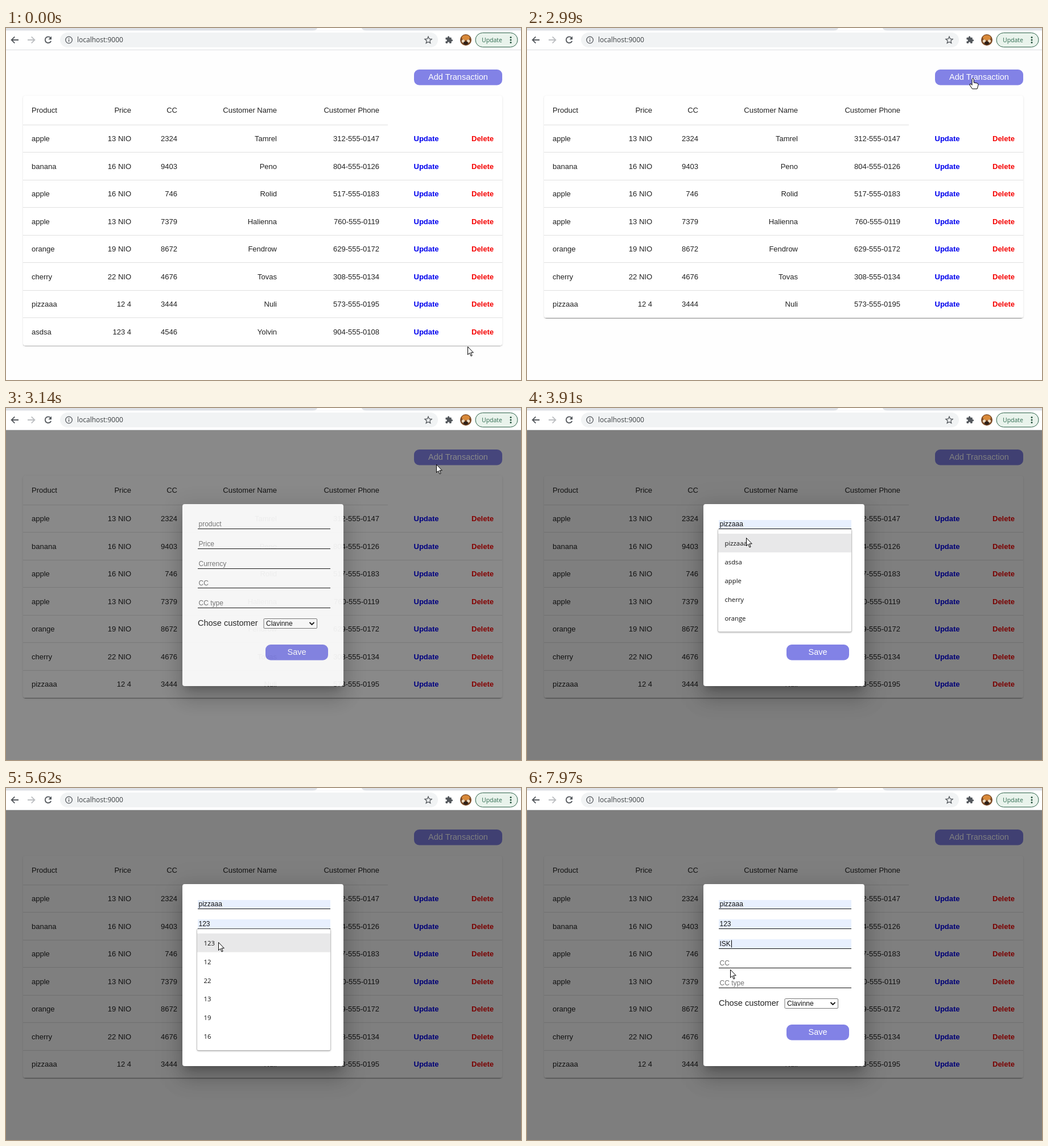
An HTML page that plays this animation: 905 by 619 pixels, repeating every 8 s.

```html
<!DOCTYPE html>
<html lang="en">
<head>
<meta charset="utf-8">
<title>Transactions</title>
<style>
  html, body { margin: 0; width: 100%; height: 100%; overflow: hidden; background: #fff; }
  svg { display: block; width: 100vw; height: 100vh; }
  text { font-family: "Liberation Sans", Arial, sans-serif; white-space: pre; }
  .ui { font-family: "Open Sans", "Noto Sans", sans-serif; }
</style>
</head>
<body>
<svg id="stage" viewBox="0 0 905 619"></svg>
<script>
const LOOP = 8000, ROW = 48.5, HEAD = 170.5, STEP = 34.75, ITEM = 32.9;
const INK = '#212121', VIOLET = '#8282e6';
const stage = document.getElementById('stage');

function add(parent, tag, attrs = {}) {
  const el = document.createElementNS(stage.namespaceURI, tag);
  for (const k in attrs) el.setAttribute(k, attrs[k]);
  parent.appendChild(el);
  return el;
}
const group = parent => add(parent, 'g');
const rect = (p, x, y, width, height, fill, more) => add(p, 'rect', { x, y, width, height, fill, ...more });
const path = (p, d, more) => add(p, 'path', { d, fill: 'none', ...more });
const circle = (p, cx, cy, r, fill, more) => add(p, 'circle', { cx, cy, r, fill, ...more });
function label(p, x, y, str, size, fill = INK, more) {
  const el = add(p, 'text', { x, y, 'font-size': size, fill, ...more });
  el.textContent = str;
  return el;
}
const END = { 'text-anchor': 'end' }, MID = { 'text-anchor': 'middle' }, BOLD = { 'font-weight': 700 };
const show = (el, on) => el.setAttribute('display', on ? 'inline' : 'none');

// White paper with layered shadows given as [dy, blur, spread, alpha]
function paper(p, x, y, w, h, r, shadows) {
  for (const [dy, blur, s, a] of shadows)
    rect(p, x - s, y - s + dy, w + 2 * s, h + 2 * s, '#000',
      { rx: r, 'fill-opacity': a, style: `filter:blur(${blur / 2}px)` });
  return rect(p, x, y, w, h, '#fff', { rx: r });
}
function button(p, x, y, w, str) {
  rect(p, x, y, w, 27.5, VIOLET, { rx: 9 });
  label(p, x + w / 2, y + 18.3, str, 14.5, '#fff', MID);
}

/* Page */
const page = group(stage);
rect(page, 0, 38, 905, 581, '#fefefe');
button(page, 717, 73, 155, 'Add Transaction');

const CARD = [[2, 1, -1, .2], [1, 1, 0, .14], [1, 3, 0, .12]];
const cards = [7, 8].map(n => {
  const g = group(page);
  paper(g, 30, 119, 842, HEAD + n * ROW - 119, 4, CARD);
  return g;
});

const RIGHTS = [220, 301, 476, 656];
function cells(p, y, values) {
  label(p, 45, y, values[0], 13);
  values.slice(1).forEach((v, i) => label(p, RIGHTS[i], y, v, 13, INK, END));
}
cells(page, 149, ['Product', 'Price', 'CC', 'Customer Name', 'Customer Phone']);
rect(page, 30, 170, 641, 1, '#e0e0e0');

const rows = [
  'apple|13 NIO|2324|Tamrel|312-555-0147',
  'banana|16 NIO|9403|Peno|804-555-0126',
  'apple|16 NIO|746|Rolid|517-555-0183',
  'apple|13 NIO|7379|Halienna|760-555-0119',
  'orange|19 NIO|8672|Fendrow|629-555-0172',
  'cherry|22 NIO|4676|Tovas|308-555-0134',
  'pizzaaa|12 4|3444|Nuli|573-555-0195',
  'asdsa|123 4|4546|Yolvin|904-555-0108'
].map((line, i) => {
  const g = group(page), y = Math.floor(HEAD + 29 + i * ROW);
  cells(g, y, line.split('|'));
  label(g, 716.5, y - .5, 'Update', 13, '#0000ee', BOLD);
  label(g, 818, y - .5, 'Delete', 13, '#f50000', BOLD);
  rect(g, 30, Math.floor(HEAD + (i + 1) * ROW - .5), 842, 1, '#e0e0e0');
  return g;
});

const shade = rect(stage, 0, 38, 905, 581, '#000');

/* Browser bar */
const bar = group(stage), GREY = '#54585d';
rect(bar, 0, 0, 905, 38, '#fff');
rect(bar, 0, 0, 905, 4.5, '#dee1e6');
path(bar, 'M539 4.6Q546 4 547 0H625Q626 4 633 4.6Z', { fill: '#fff' });
rect(bar, 0, 38, 905, 1, '#dcdee1');
rect(bar, 95, 8, 664, 26, '#f1f3f4', { rx: 13 });
path(bar, 'M22 21H10M15.3 15.3L9.6 21L15.3 26.7', { stroke: GREY, 'stroke-width': 1.8 });
path(bar, 'M38 21H50M44.7 15.3L50.4 21L44.7 26.7', { stroke: '#bcbec1', 'stroke-width': 1.8 });
path(bar, 'M78.2 17.2A5.4 5.4 0 1 0 79.2 22.8', { stroke: GREY, 'stroke-width': 1.8 });
path(bar, 'M80 14.6V20.2H74.4Z', { fill: GREY });
circle(bar, 110.5, 21, 5.8, 'none', { stroke: GREY, 'stroke-width': 1.3 });
path(bar, 'M110.5 20V24.3M110.5 17.6V18.9', { stroke: GREY, 'stroke-width': 1.3 });
label(bar, 125, 25.3, 'localhost:9000', 12, '#3c4043', { class: 'ui' });
let star = '';
for (let i = 0; i < 10; i++) {
  const a = i * Math.PI / 5, r = i % 2 ? 2.9 : 6.4;
  star += (i ? 'L' : 'M') + (742 + r * Math.sin(a)) + ' ' + (21.5 - r * Math.cos(a));
}
path(bar, star + 'Z', { stroke: GREY, 'stroke-width': 1.3 });
path(bar, 'M20.5 11H19V7c0-1.1-.9-2-2-2h-4V3.5a2.5 2.5 0 0 0-5 0V5H4c-1.1 0-2 .9-2 2v3.8h1.5a2.7 2.7 0 0 1 0 5.4H2V20c0 1.1.9 2 2 2h3.8v-1.5a2.7 2.7 0 0 1 5.4 0V22H17c1.1 0 2-.9 2-2v-4h1.5a2.5 2.5 0 0 0 0-5z',
  { fill: GREY, transform: 'translate(771.2 13.6) scale(.61)' });
circle(bar, 808, 21, 10, '#7c4a24');
add(bar, 'ellipse', { cx: 808, cy: 17, rx: 7, ry: 4.5, fill: '#d98a3a' });
circle(bar, 803.5, 23, 2.7, '#ead9c0');
circle(bar, 812.5, 23, 2.7, '#ead9c0');
add(bar, 'ellipse', { cx: 808, cy: 26.5, rx: 4, ry: 3, fill: '#2f2018' });
rect(bar, 825, 8.5, 74, 25, '#e9f3ec', { rx: 12.5, stroke: '#2c6148' });
label(bar, 836, 25, 'Update', 10.5, '#2f6b50', { class: 'ui' });
for (const y of [16.5, 21, 25.5]) circle(bar, 887, y, 1.5, '#24513c');

/* Dialog */
const modal = group(stage);
paper(modal, 310, 169, 283, 320, 4, [[10, 14, -6, .2], [22, 34, 3, .14], [8, 41, 7, .12]]);

const fields = [
  { name: 'product', value: 'pizzaaa', focus: 3680, open: 3760, pick: 4430,
    items: ['pizzaaa', 'asdsa', 'apple', 'cherry', 'orange'] },
  { name: 'Price', value: '123', focus: 4800, open: 4830, pick: 5650,
    items: ['123', '12', '22', '13', '19', '16'] },
  { name: 'Currency', value: 'ISK', focus: 6230, open: 6290, pick: 7480,
    items: ['4', 'ISK', 'dasdas', '23', 'das'] },
  { name: 'CC' },
  { name: 'CC type' }
];
fields.forEach((f, i) => {
  f.line = 212.5 + i * STEP;
  f.fill = rect(modal, 337, Math.round(f.line - 16), 233, 16, '#e8f0fe');
  rect(modal, 337, Math.round(f.line - .5), 233, 1, '#111');
  f.hint = label(modal, 338.5, f.line - 4.3, f.name, 12, '#757575');
  f.text = label(modal, 338.5, f.line - 4.3, '', 12, '#111');
  f.caret = rect(modal, 339, f.line - 14.5, 1, 13, '#000');
});
let wave = 'M339 210';
for (let x = 341; x <= 381; x += 2) wave += `L${x} ${x % 4 === 1 ? 208.8 : 210.6}`;
const typo = path(modal, wave, { stroke: '#f03030', 'stroke-width': .9 });

label(modal, 337, 383, 'Chose customer', 14.5);
rect(modal, 453, 370.5, 93.5, 17, '#fff', { rx: 1.5, stroke: '#767676' });
label(modal, 457, 383.2, 'Clavinne', 12, '#111');
path(modal, 'M533.5 377L537.5 381L541.5 377', { stroke: '#111', 'stroke-width': 1.8 });
button(modal, 456, 416, 110, 'Save');

for (const f of fields) if (f.items) {
  f.top = f.line + .5;
  f.popup = group(modal);
  paper(f.popup, 336, f.top, 234, 16 + f.items.length * ITEM, 2, [[1, 3, 0, .4], [0, 1, .5, .2]]);
  f.glow = rect(f.popup, 336, f.top, 234, ITEM, '#e8e8e9');
  f.items.forEach((s, i) =>
    label(f.popup, 347.5, f.top + 29 + i * ITEM, s, 11.3, '#111', { class: 'ui' }));
}

/* Pointer */
const pointer = group(stage);
const WHITE = { fill: '#fff', stroke: '#000', 'stroke-linejoin': 'round' };
const shapes = {
  arrow: path(pointer, 'M.5 .5V14.5L3.7 11.5L6.1 17L8.1 16.1L5.8 10.8H10.3Z', WHITE),
  hand: path(pointer, 'M-2 10V1.5a1.6 1.6 0 0 1 3.2 0V7l5.5 1q2.3.5 2.3 2.8L8 15l-1 3H-1.5L-5.5 12q-1.5-2.5.5-2.8q1.5-.2 3 2.3z', WHITE),
  beam: path(pointer, 'M-3 -7.5Q0 -7.5 0 -6V6Q0 7.5 -3 7.5M3 -7.5Q0 -7.5 0 -6M0 6Q0 7.5 3 7.5', { stroke: '#000', 'stroke-width': 1.2 })
};
const track = [
  [70, 811, 560], [520, 845, 541], [700, 845, 541], [830, 841, 533], [1000, 841, 533],
  [1040, 838, 529], [1830, 838, 529], [2330, 783, 63], [2530, 785, 86], [2760, 785, 88],
  [3070, 783, 90], [3140, 757, 99], [3530, 395, 215], [3680, 388, 206], [3760, 388, 206],
  [3990, 383, 240], [4830, 383, 240], [4960, 383, 240], [5000, 376, 237], [5200, 376, 237],
  [5400, 373, 271], [5900, 372, 271], [6000, 372, 280], [6640, 372, 280], [6710, 368, 287],
  [6790, 365, 362], [7000, 365, 362], [7270, 358, 335], [7420, 358, 335], [7540, 358, 327],
  [7830, 358, 322], [7930, 358, 322], [7970, 357, 319]
];
function locate(t) {
  const i = track.findIndex(k => k[0] > t);
  if (i === 0) return track[0].slice(1);
  if (i < 0) return track[track.length - 1].slice(1);
  const [a, ax, ay] = track[i - 1], [b, bx, by] = track[i], u = (t - a) / (b - a);
  return [ax + (bx - ax) * u, ay + (by - ay) * u];
}

// cubic-bezier(.4, 0, .2, 1)
function ease(x) {
  if (x <= 0) return 0;
  if (x >= 1) return 1;
  let lo = 0, hi = 1, s = .5;
  for (let i = 0; i < 20; i++) {
    s = (lo + hi) / 2;
    if (1.2 * s * (1 - s) ** 2 + .6 * s * s * (1 - s) + s ** 3 < x) lo = s; else hi = s;
  }
  return s * s * (3 - 2 * s);
}

function cursorKind(x, y, count, dialog, popup) {
  if (dialog) {
    if (popup && y >= popup.top) return 'arrow';
    const over = fields.some(f => y > f.line - 16 && y < f.line);
    return over && x > 337 && x < 570 ? 'beam' : 'arrow';
  }
  if (x > 717 && x < 872 && y > 73 && y < 100) return 'hand';
  const row = Math.floor((y - HEAD) / ROW);
  const near = Math.abs(y - HEAD - (row + .5) * ROW) < 7;
  return row >= 0 && row < count && near && x > 818 && x < 857 ? 'hand' : 'arrow';
}

function draw(t) {
  const count = t < 1300 ? 8 : 7;
  show(cards[0], count === 7);
  show(cards[1], count === 8);
  show(rows[7], count === 8);

  const fade = ease((t - 3013) / 190), [x, y] = locate(t);
  shade.setAttribute('opacity', fade / 2);
  modal.setAttribute('opacity', fade);
  show(modal, fade > 0);

  let popup = null;
  fields.forEach((f, i) => {
    let value = '', focused = false, preview = false;
    if (f.items) {
      const open = t >= f.open && t < f.pick;
      const hover = open ? Math.floor((y - f.top - 8) / ITEM) : -1;
      if (open) popup = f;
      preview = hover >= 0;
      value = t >= f.pick ? f.value : preview ? f.items[hover] : '';
      focused = t >= f.focus && t < (fields[i + 1].focus || LOOP);
      show(f.popup, open);
      show(f.glow, preview);
      f.glow.setAttribute('y', f.top + 8 + Math.max(hover, 0) * ITEM);
    }
    f.text.textContent = value;
    show(f.fill, value);
    show(f.hint, !value);
    const since = t - (t >= f.pick ? f.pick : f.focus);
    const lit = focused && !preview && since % 1060 < 530;
    show(f.caret, lit);
    if (lit) f.caret.setAttribute('x', Math.round(339 + (value ? f.text.getComputedTextLength() + .5 : 0)));
  });
  show(typo, t >= fields[0].pick && t < fields[1].focus);

  const kind = cursorKind(x, y, count, fade > 0, popup);
  for (const k in shapes) show(shapes[k], k === kind);
  pointer.setAttribute('transform', `translate(${Math.round(x)} ${Math.round(y)})`);
}

function tick() {
  draw(performance.now() % LOOP);
  requestAnimationFrame(tick);
}
tick();
</script>
</body>
</html>
```
